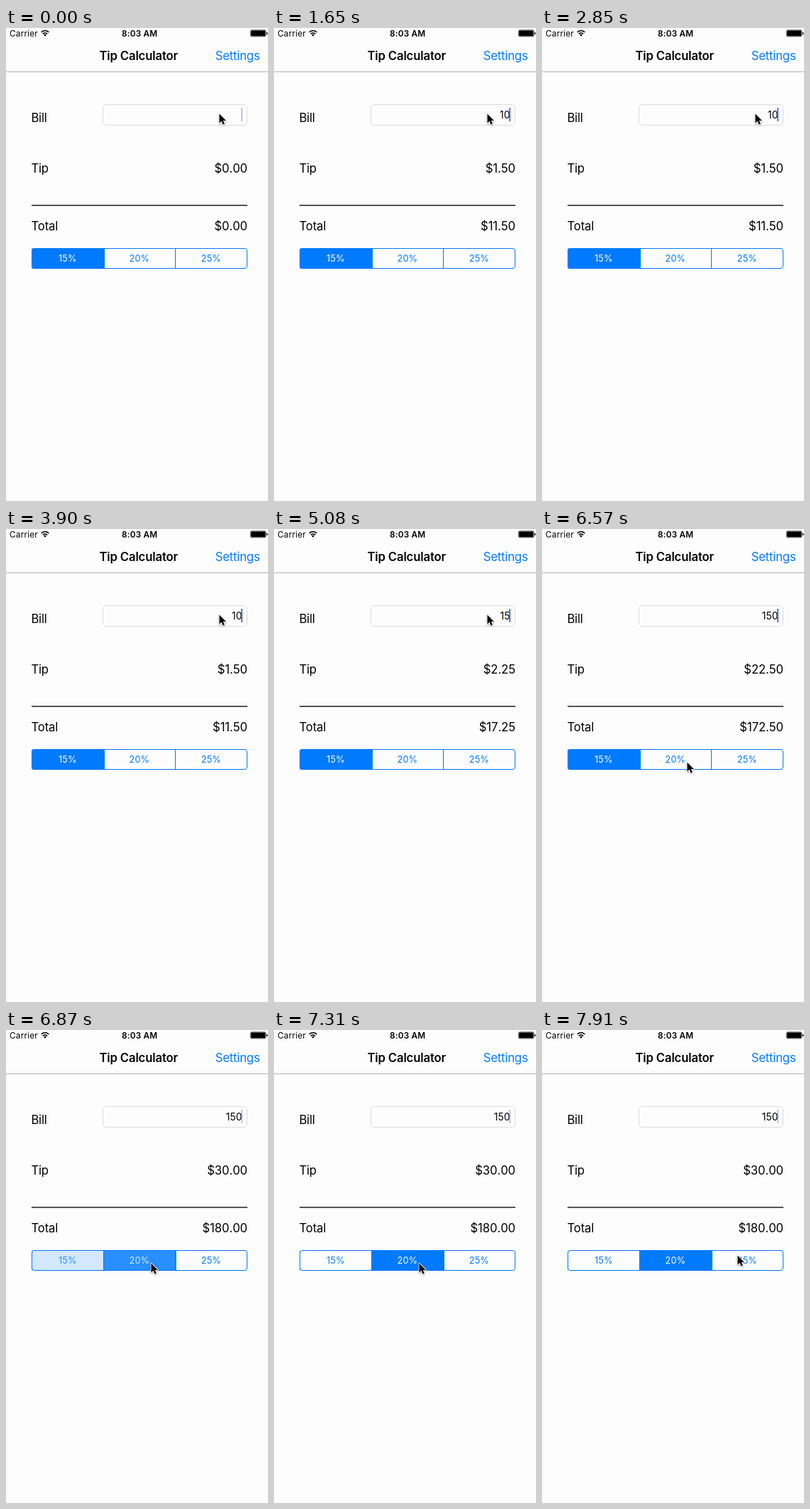
An HTML page for the animation above (8 s loop, 369x664 px).

```html
<!DOCTYPE html>
<html lang="en">
<head>
<meta charset="utf-8">
<title>Tip Calculator</title>
<style>
  html, body { margin: 0; width: 100%; height: 100%; overflow: hidden; background: #fdfdfd; }
  svg { display: block; width: 100%; height: 100%; }
  text { font: 16.7px Inter, Roboto, sans-serif; letter-spacing: -.2px; fill: #000; }
  .status { font-size: 11.8px; letter-spacing: .2px; }
  .bold { font-weight: 600; }
  .title { letter-spacing: -.15px; }
  .blue { fill: #007aff; }
  .end { text-anchor: end; }
  .mid { text-anchor: middle; }
  .sum { letter-spacing: -.1px; font-kerning: none; }
  .field { font-size: 13.8px; letter-spacing: .1px; font-kerning: none; }
  .seg { font-size: 12.8px; letter-spacing: .1px; text-anchor: middle; }
  #pointer { filter: drop-shadow(0 1px .8px rgba(0, 0, 0, .35)); }
</style>
</head>
<body>
<svg viewBox="0 0 369 664">
  <rect width="369" height="664" fill="#fdfdfd"/>

  <text class="status" x="5" y="11.5">Carrier</text>
  <g fill="none" stroke="#000" stroke-width="1.6">
    <path d="M49.7 6a7.4 7.4 0 0 1 10.6 0M51.9 8.3a4.5 4.5 0 0 1 6.2 0"/>
    <path d="M55 11.8l-1.9-2a2.7 2.7 0 0 1 3.8 0z" fill="#000" stroke="none"/>
  </g>
  <text class="status bold mid" x="188.2" y="11.5">8:03 AM</text>
  <rect x="344.5" y="2.9" width="21.4" height="9" rx="1.6" fill="none" stroke="#000" stroke-width=".7"/>
  <rect x="345.2" y="3.6" width="20" height="7.6" rx=".8"/>
  <path d="M366.8 5.6q1.6 .4 1.6 1.8t-1.6 1.8z"/>

  <text class="bold mid title" x="186.7" y="45">Tip Calculator</text>
  <text class="blue end" x="357.5" y="45">Settings</text>
  <rect y="61" width="369" height="1" fill="#b0b0b3"/>

  <text x="35.4" y="132">Bill</text>
  <rect x="136.5" y="107.5" width="203" height="29" rx="4.5" fill="#fdfdfd" stroke="#dcdcdc"/>
  <text id="bill" class="field end" x="332.5" y="126.5"></text>
  <rect id="caret" x="331.2" y="112" width="1.8" height="19" fill="#426bf2"/>

  <text x="35.4" y="203">Tip</text>
  <text id="tip" class="sum end" x="340" y="202.5"></text>
  <rect x="36" y="248" width="304" height="2" fill="#55555a"/>
  <text x="35.6" y="284.3">Total</text>
  <text id="total" class="sum end" x="340" y="284.3"></text>

  <clipPath id="round"><rect x="36" y="309" width="304" height="29" rx="3.5"/></clipPath>
  <g id="segments" clip-path="url(#round)"></g>
  <rect x="36.5" y="309.5" width="303" height="28" rx="3.5" fill="none" stroke="#007aff"/>

  <g id="pointer">
    <path transform="scale(.92)" d="M0 0v14.2l3.3-3 2.2 5 2.5-1.1-2.2-4.9h4.4z" stroke="#fff"
      stroke-width="1.8" stroke-linejoin="round" paint-order="stroke"/>
  </g>
</svg>
<script>
const LOOP = 8000;
const TAP = 6870;
const HOPS = 5;
const RATES = [15, 20, 25];
const $ = id => document.getElementById(id);

const keys = [
  { time: -600, bill: '' }, { time: 1650, bill: '10' }, { time: 3300, bill: '100' },
  { time: 3900, bill: '10' }, { time: 4040, bill: '1' }, { time: 5080, bill: '15' },
  { time: 5230, bill: '150' }
];
const home = [300.5, 120.5];
const moves = [
  { start: 5830, end: 6570, to: [204.5, 327.5] },
  { start: 7170, end: 7910, to: [275.5, 316.5] }
];

$('segments').innerHTML = RATES.map((rate, i) => {
  const x = 36.5 + i * 101;
  return `<rect class="blue" x="${x - .5}" y="309" width="103" height="29"/>
    <path d="M${x} 309v29" stroke="#007aff"/>
    <text class="seg" x="${x + 50.4}" y="328.2">${rate}%</text>`;
}).join('');
const fills = $('segments').querySelectorAll('rect');
const labels = $('segments').querySelectorAll('text');

const money = n => '$' + n.toFixed(2);
const ease = k => k * k * (3 - 2 * k);
const clamp = k => Math.min(1, Math.max(0, k));

// Solid after a key press, then a pulse: fading, hidden, returning, solid.
function caretAlpha(idle) {
  if (idle < 600) return 1;
  const phase = (idle - 600) % 1040;
  if (phase >= 590) return 1;
  return phase >= 150 && phase < 440 ? 0 : .45;
}

// The pointer advances in a few visible hops.
function pointerAt(t) {
  return moves.reduce((from, { start, end, to }) => {
    const k = ease(Math.floor(clamp((t - start) / (end - start)) * HOPS) / HOPS);
    return from.map((v, i) => v + (to[i] - v) * k);
  }, home);
}

function draw(t) {
  const key = keys.findLast(k => k.time <= t);
  const tip = key.bill * RATES[t < TAP ? 0 : 1] / 100;
  $('bill').textContent = key.bill;
  $('tip').textContent = money(tip);
  $('total').textContent = money(+key.bill + tip);
  $('caret').setAttribute('opacity', caretAlpha(t - key.time));

  const fade = t < TAP ? 0 : t < TAP + 140 ? .84 : 1;
  [1 - fade, fade, 0].forEach((k, i) => {
    fills[i].setAttribute('opacity', k);
    labels[i].style.fill = `rgb(${255 * k}, ${122 + 133 * k}, 255)`;
  });
  $('pointer').setAttribute('transform', `translate(${pointerAt(t)})`);
}

const start = performance.now();
function tick() {
  draw((performance.now() - start) % LOOP);
  requestAnimationFrame(tick);
}
tick();
</script>
</body>
</html>
```
